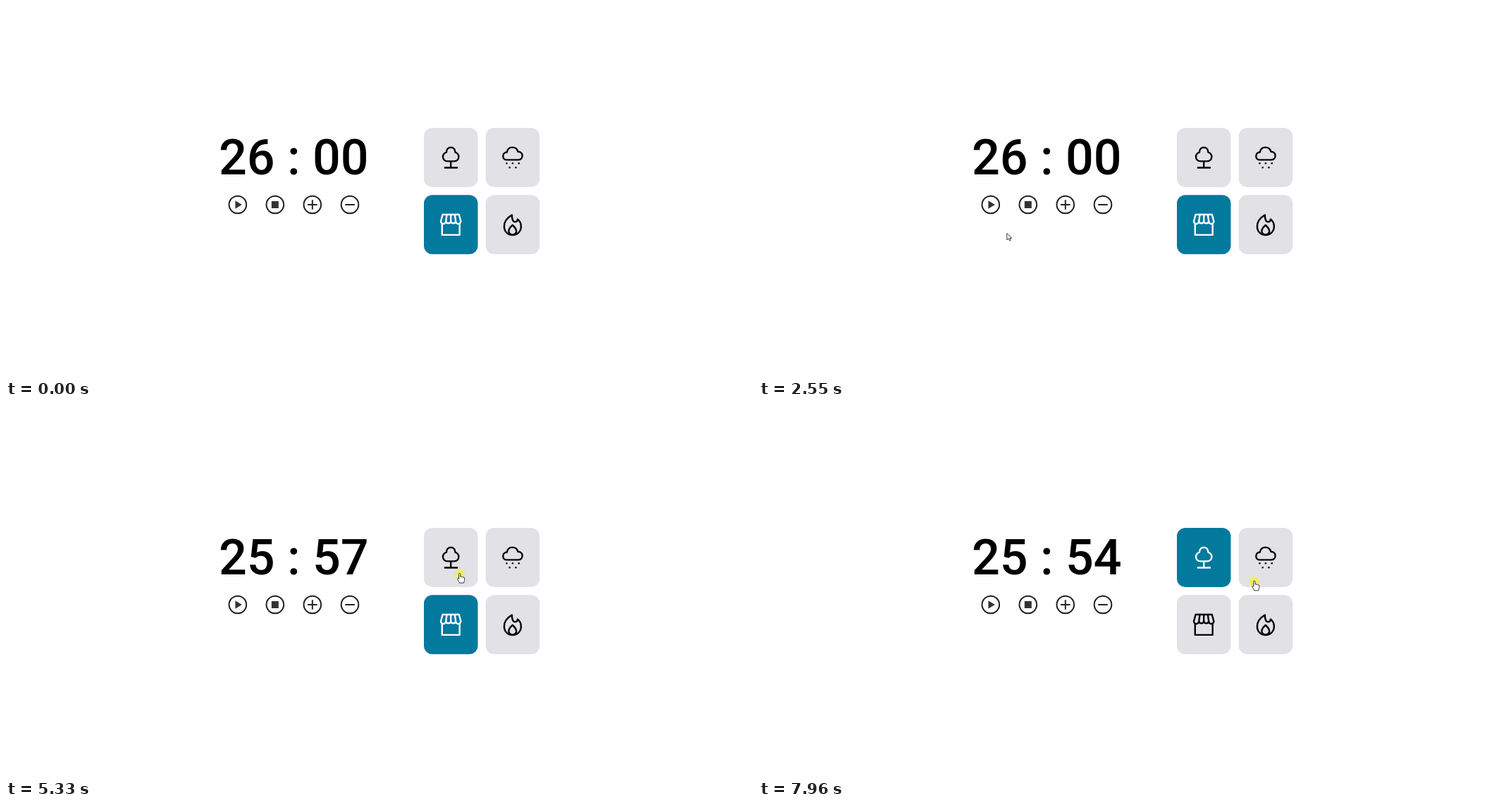
Recreate the animation shown at these times as an HTML page. Size 1060 by 528 pixels, loop 8 s.

```html
<!DOCTYPE html>
<html lang="en">
<head>
<meta charset="utf-8">
<title>Focus timer</title>
<style>
  html, body { margin: 0; width: 100%; height: 100%; overflow: hidden; background: #fff; }
  svg { display: block; width: 100%; height: 100%; }
  #clock { font: 500 70px Roboto, sans-serif; white-space: pre; }
  .buttons { fill: none; stroke: #222; stroke-width: 2; }
  .buttons .solid { fill: #323238; stroke: none; }
  .card rect { fill: #e1e1e6; }
  .card g { fill: none; stroke: #050505; stroke-width: 2.4; stroke-linejoin: round; }
  .card .dots { fill: #050505; stroke: none; }
  .card.on rect { fill: #02799d; }
  .card.on g { stroke: #fff; }
  .pointer { fill: #fff; stroke: #222; stroke-width: .9; stroke-linejoin: round; }
</style>
</head>
<body>
<svg viewBox="0 0 1060 528">
  <text id="clock" x="408.3" y="238.5" text-anchor="middle">26 : 00</text>

  <g class="buttons">
    <circle cx="328.8" cy="282" r="12.3"/>
    <circle cx="381.8" cy="282" r="12.3"/>
    <circle cx="434.8" cy="282" r="12.3"/>
    <circle cx="488" cy="282" r="12.3"/>
    <path class="solid" d="M325.4 276.2V287.8L334.8 282Z"/>
    <path class="solid" d="M376.8 277h10v10h-10Z"/>
    <path d="M428 282h13.6M434.8 275.2v13.6M481.2 282h13.6"/>
  </g>

  <g class="card" id="forest">
    <rect x="593" y="173" width="76.5" height="84" rx="12"/>
    <g>
      <path d="M626.6 220.4C622.5 220.4 620 217.4 620 214.1C620 211 622 208.6 625 207.6C625 203.6 627.6 200.7 631.2 200.7S637.4 203.6 637.4 207.6C640.4 208.6 642.4 211 642.4 214.1C642.4 217.4 640 220.4 635.8 220.4Z"/>
      <path d="M631.2 220.4V229.5M621.8 229.5H641"/>
    </g>
  </g>
  <g class="card" id="rain">
    <rect x="680.7" y="173" width="76.5" height="84" rx="12"/>
    <g>
      <path d="M710.5 218.4C707.5 218.4 705.3 216 705.3 213C705.3 210 707.8 207.6 710.8 207.5C711.6 203.2 714.6 200.6 718.4 200.6C722.6 200.6 725.6 203 726.4 206.8C730.2 206.9 732.7 209.3 732.7 212.6C732.7 216 730 218.4 726.6 218.4Z"/>
    </g>
    <g class="dots">
      <circle cx="710.5" cy="223.2" r="1.3"/>
      <circle cx="719" cy="223.2" r="1.3"/>
      <circle cx="727.8" cy="223.2" r="1.3"/>
      <circle cx="714.7" cy="229.3" r="1.3"/>
      <circle cx="723.4" cy="229.3" r="1.3"/>
    </g>
  </g>
  <g class="card" id="shop">
    <rect x="593" y="268.2" width="76.5" height="84" rx="12"/>
    <g>
      <path d="M619.6 296H642.8L645.4 305.6A3.6 3.6 0 0 1 638.2 305.6A3.6 3.6 0 0 1 631.2 305.6A3.6 3.6 0 0 1 624.2 305.6A3.6 3.6 0 0 1 617 305.6Z"/>
      <path d="M625.6 296L624.2 305.6M631.2 296V305.6M636.8 296L638.2 305.6M618.8 308.6V324.9H643.7V308.6"/>
    </g>
  </g>
  <g class="card" id="fire">
    <rect x="680.7" y="268.2" width="76.5" height="84" rx="12"/>
    <g>
      <path d="M718 296.6C711 300.5 706.9 306.5 706.9 313C706.9 320 712 325 718.8 325S730.9 320 730.9 313C730.9 308.5 729 305 726 302.6C726 305 724.5 306.4 722.5 306.4C719.5 306.4 717.6 302.5 718 296.6Z"/>
      <path d="M718.8 311C716 313.5 713.4 316 713.4 319.4A5.4 5.4 0 0 0 724.2 319.4C724.2 316 721.5 313.5 718.8 311Z"/>
    </g>
  </g>

  <g id="cursor">
    <circle id="click" r="7" fill="#f5f03c"/>
    <path id="arrow" class="pointer" d="M.4 .4V9.9L2.6 7.9L4.2 11.1L5.8 10.4L4.3 7.3H7.2Z"/>
    <path id="hand" class="pointer" d="M-1.2 0C-1.2 -1.4 1 -1.4 1 0V4C1.4 3.2 3 3.4 3 4.4C3.5 3.7 5 4 5 5C5.5 4.4 6.8 4.6 6.8 5.8V9C6.8 10.4 5.8 11 5.8 12.6H-.4C-.6 11 -2.8 8.6 -3.2 7C-3.4 5.8 -2.2 5.6 -1.2 7Z"/>
  </g>
</svg>
<script>
const LOOP = 8000, FIRST_MOVE = 510, STEP = 65.9;
const $ = id => document.getElementById(id);

const ease = {
  hold: () => 0,
  in: p => p * p,
  out: p => 1 - (1 - p) ** 2,
  both: p => p * p * (3 - 2 * p)
};

// time, x, y, easing towards the next point
const path = [
  [510, 1012, 510, 'both'],
  [1235, 333, 309, 'both'],
  [1300, 338, 306, 'hold'],
  [1302, 338, 306, 'both'],
  [1495, 333, 284, 'hold'],
  [2094, 333, 284, 'both'],
  [2810, 359, 338, 'hold'],
  [3144, 359, 338, 'in'],
  [3410, 412.5, 357.8, 'out'],
  [3740, 500, 348, 'hold'],
  [4274, 500, 348, 'in'],
  [4670, 517.3, 347.8, 'both'],
  [5130, 643.3, 239.5, 'both'],
  [5200, 643.8, 238.5, 'hold'],
  [7104, 643.8, 238.5, 'both'],
  [7700, 703, 249.3, 'hold']
];
// start, end, opacity
const clicks = [[1700, 1760, .7], [5330, 5390, .7], [7900, 7960, .6], [7960, 8000, .8]];
const ticks = [2740, 3740, 4735, 5730, 6710, 7700];

function cursorAt(t) {
  const i = path.findLastIndex(k => k[0] <= t);
  const [t0, x0, y0, kind] = path[i];
  const [t1, x1, y1] = path[i + 1] || [LOOP, x0, y0];
  const p = ease[kind]((t - t0) / (t1 - t0));
  return [x0 + (x1 - x0) * p, y0 + (y1 - y0) * p];
}

function isClickable(x, y) {
  const onButton = [328.8, 381.8, 434.8, 488].some(cx => Math.hypot(x - cx, y - 282) < 13.3);
  const inColumn = [593, 680.7].some(left => x > left && x < left + 76.5);
  const inRow = [173, 268.2].some(top => y > top && y < top + 84);
  return onButton || (inColumn && inRow);
}

const show = (el, on) => { el.style.display = on ? '' : 'none'; };

function draw(t) {
  const left = 26 * 60 - ticks.filter(k => t >= k).length;
  $('clock').textContent = `${Math.floor(left / 60)} : ${String(left % 60).padStart(2, '0')}`;

  const selectedForest = t >= 5390;
  $('forest').classList.toggle('on', selectedForest);
  $('shop').classList.toggle('on', !selectedForest);

  show($('cursor'), t >= FIRST_MOVE);
  if (t < FIRST_MOVE) return;

  // the pointer is sampled about fifteen times a second
  const sampled = FIRST_MOVE + STEP * Math.floor((t - FIRST_MOVE + 12) / STEP);
  const [x, y] = cursorAt(sampled);
  $('cursor').setAttribute('transform', `translate(${x.toFixed(1)} ${y.toFixed(1)})`);
  const clickable = isClickable(x, y);
  show($('hand'), clickable);
  show($('arrow'), !clickable);

  const click = clicks.find(([from, to]) => t >= from && t < to);
  $('click').setAttribute('opacity', click ? click[2] : 0);
}

const start = performance.now();
function frame() {
  draw((performance.now() - start) % LOOP);
  requestAnimationFrame(frame);
}
frame();
</script>
</body>
</html>
```
